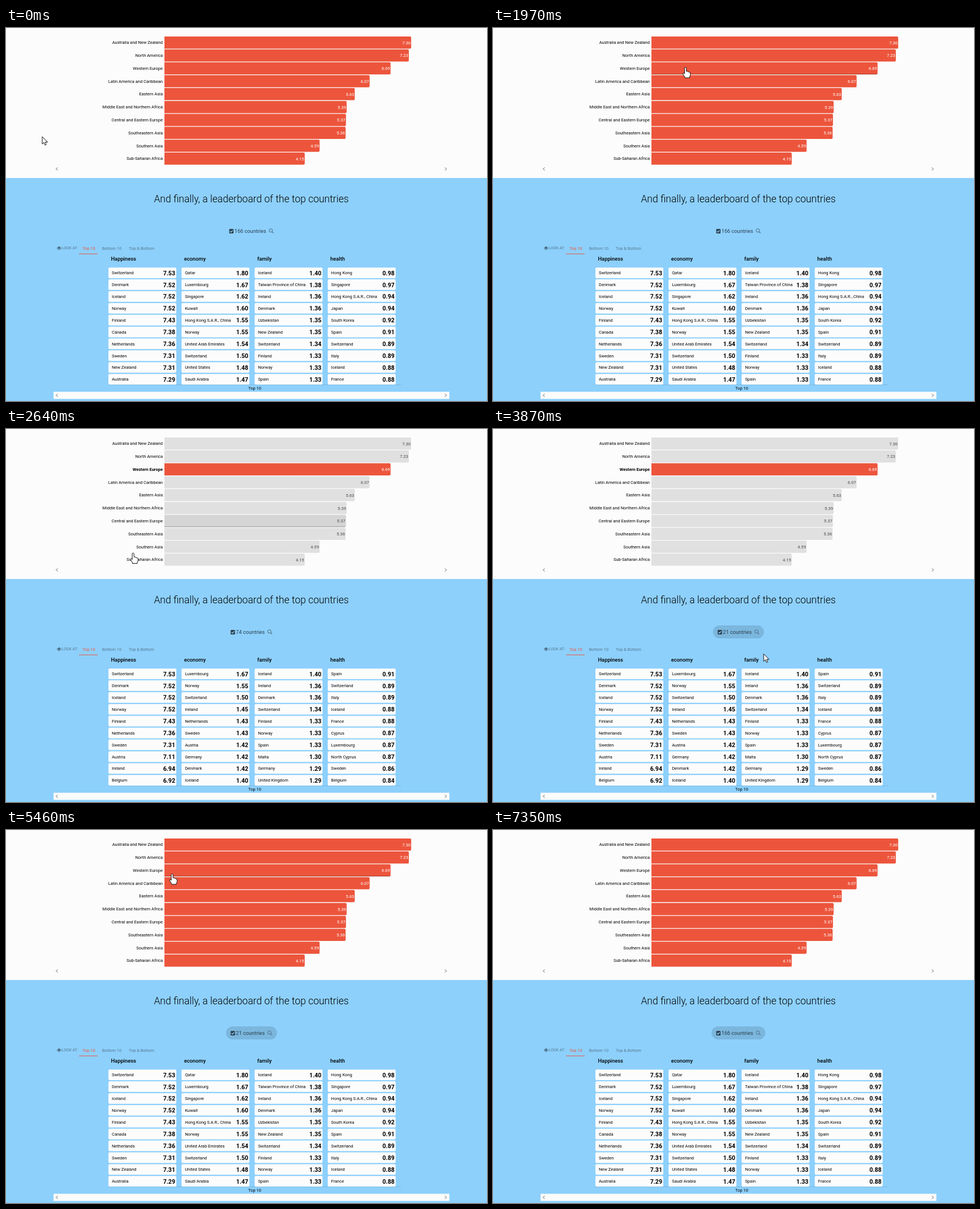
Write an HTML page that moves like this. It is 850 px wide and 659 px high and loops after 8130 ms.

```html
<!DOCTYPE html>
<html lang="en">
<head>
<meta charset="utf-8">
<title>Happiness leaderboard</title>
<style>
html, body { margin: 0; width: 100%; height: 100%; overflow: hidden; background: #fcfcfc; }
svg { display: block; }
#stage { position: absolute; left: 0; top: 0; font: 7.5px Roboto, "Open Sans", sans-serif; }
.end { text-anchor: end; }
.mid { text-anchor: middle; }
.title { font-size: 17.5px; font-weight: 300; }
.head { font-size: 9.3px; font-weight: 500; }
.score { font-size: 10.6px; font-weight: 700; }
.tab { font-size: 7.4px; fill: #56788f; }
.bar { fill: #ec553c; }
.num { fill: #fff; fill-opacity: .82; font-weight: 500; }
.shade { fill: #000; opacity: 0; }
.edge { fill: #000; opacity: 0; }
.hover .edge { opacity: .3; }
.picking .bar { fill: #e0e0e0; }
.picking .num { fill: #666; fill-opacity: 1; }
.picking .hover .shade { opacity: .05; }
.picking .chosen .bar { fill: #ec553c; }
.picking .chosen .num { fill: #fff; fill-opacity: .85; }
.picking .chosen .label { font-weight: 700; }
.picking .chosen .shade { opacity: 0; }
.chevron { fill: none; stroke: #999; stroke-width: 1.2; }
#pill { position: absolute; left: 433.5px; top: 347px; height: 23px; padding: 0 8px;
  transform: translateX(-50%); display: flex; align-items: center; white-space: nowrap;
  border-radius: 12px; font: 9.2px Roboto, "Open Sans", sans-serif; color: #2c4150; }
#pill.lit { background: #7bb6dd; }
#count { margin: 0 4.5px 0 2px; }
#pointer { position: absolute; left: 0; top: 0; }
#pointer path { fill: #fff; stroke: #111; stroke-linejoin: round; }
</style>
</head>
<body>
<svg id="stage" width="850" height="659"></svg>
<div id="pill">
  <svg width="8" height="8"><rect width="8" height="8" rx="1.5" fill="#2c4150"/><path d="M1.6 4L3.4 5.8 6.5 2.4" fill="none" stroke="#8dd0fc" stroke-width="1.3"/></svg>
  <span id="count"></span>
  <svg width="9" height="9"><path d="M5.9 5.9L8.4 8.4" stroke="#58819d" stroke-width="1.5"/><circle cx="3.7" cy="3.7" r="2.9" fill="none" stroke="#58819d" stroke-width="1.2"/></svg>
</div>
<svg id="pointer" width="850" height="659"><path/></svg>
<script>
const LOOP = 8130;
const $ = id => document.getElementById(id);
const stage = $('stage'), pill = $('pill'), count = $('count');
const cursor = document.querySelector('#pointer path');

const regions = `Australia and New Zealand 7.30|North America 7.23|Western Europe 6.69
Latin America and Caribbean 6.07|Eastern Asia 5.63|Middle East and Northern Africa 5.39
Central and Eastern Europe 5.37|Southeastern Asia 5.36|Southern Asia 4.59|Sub-Saharan Africa 4.15`;

const world = {
  Happiness: `Switzerland 7.53|Denmark 7.52|Iceland 7.52|Norway 7.52|Finland 7.43
Canada 7.38|Netherlands 7.36|Sweden 7.31|New Zealand 7.31|Australia 7.29`,
  economy: `Qatar 1.80|Luxembourg 1.67|Singapore 1.62|Kuwait 1.60|Hong Kong S.A.R., China 1.55
Norway 1.55|United Arab Emirates 1.54|Switzerland 1.50|United States 1.48|Saudi Arabia 1.47`,
  family: `Iceland 1.40|Taiwan Province of China 1.38|Ireland 1.36|Denmark 1.36|Uzbekistan 1.35
New Zealand 1.35|Switzerland 1.34|Finland 1.33|Norway 1.33|Spain 1.33`,
  health: `Hong Kong 0.98|Singapore 0.97|Hong Kong S.A.R., China 0.94|Japan 0.94|South Korea 0.92
Spain 0.91|Switzerland 0.89|Italy 0.89|Iceland 0.88|France 0.88`
};
const west = {
  Happiness: `Switzerland 7.53|Denmark 7.52|Iceland 7.52|Norway 7.52|Finland 7.43
Netherlands 7.36|Sweden 7.31|Austria 7.11|Ireland 6.94|Belgium 6.92`,
  economy: `Luxembourg 1.67|Norway 1.55|Switzerland 1.50|Ireland 1.45|Netherlands 1.43
Sweden 1.43|Austria 1.42|Germany 1.42|Denmark 1.42|Iceland 1.40`,
  family: `Iceland 1.40|Ireland 1.36|Denmark 1.36|Switzerland 1.34|Finland 1.33
Norway 1.33|Spain 1.33|Malta 1.30|Germany 1.29|United Kingdom 1.29`,
  health: `Spain 0.91|Switzerland 0.89|Italy 0.89|Iceland 0.88|France 0.88
Cyprus 0.87|Luxembourg 0.87|North Cyprus 0.87|Sweden 0.86|Belgium 0.84`
};

const parse = list => list.split(/[|\n]/).map(s => [s.slice(0, -5), s.slice(-4)]);
const text = (x, y, s, cls = '') => `<text x="${x}" y="${y}" class="${cls}">${s}</text>`;
const rect = (x, y, w, h, more) => `<rect x="${x}" y="${y}" width="${w}" height="${h}" ${more}/>`;
const chevrons = y => `<path class="chevron" d="M91.5 ${y - 2.6}L88.5 ${y} 91.5 ${y + 2.6}M775.5 ${y - 2.6}L778.5 ${y} 775.5 ${y + 2.6}"/>`;

const BAR_TOP = 15, BAR_STEP = 22.78;

function barRow([name, value], i) {
  const y = BAR_TOP + i * BAR_STEP, w = value * 59.73;
  const shape = `d="M280 ${y}h${w - 2}q2 0 2 2v17.5q0 2 -2 2h${2 - w}z"`;
  return `<g class="row ${i === 2 ? 'chosen' : ''}">` +
    `<path class="bar" ${shape}/><path class="shade" ${shape}/>` +
    rect(280, y + 20.5, w - 1, 1, 'class="edge"') +
    text(277, y + 13.3, name, 'label end') +
    text(279 + w, y + 13.7, value, 'num end') + '</g>';
}

function table(id, data) {
  const columns = Object.entries(data).map(([head, list], c) => {
    const x = 181 + c * 129.2;
    return text(x + 4.5, 410.5, head, 'head') + parse(list).map(([name, value], r) => {
      const y = 423.2 + r * 20.9;
      return rect(x, y, 120, 18.7, 'rx="2" fill="#fcfcfc"') +
        text(x + 6, y + 12, name) + text(x + 118, y + 13.4, value, 'score end');
    }).join('');
  });
  return `<g id="${id}">${columns.join('')}</g>`;
}

stage.innerHTML =
  rect(0, 265, 850, 394, 'fill="#8dd0fc"') +
  parse(regions).map(barRow).join('') +
  chevrons(249) +
  text(433.5, 308, 'And finally, a leaderboard of the top countries', 'title mid') +
  '<path d="M90.3 389q3.5 -5 7 0q-3.5 5 -7 0z" fill="none" stroke="#3f596b"/><circle cx="93.8" cy="388.6" r="1.6" fill="#3f596b"/>' +
  '<text x="98.7" y="391.4" class="tab" style="font-size:6.8px">LOOK AT:</text>' +
  '<text x="135" y="391.7" class="tab" style="fill:#ec553c">Top 10</text>' +
  text(169.7, 391.7, 'Bottom 10', 'tab') + text(217, 391.7, 'Top &amp; Bottom', 'tab') +
  rect(129, 398.6, 33, 1, 'fill="#ec553c"') +
  rect(181, 629.8, 517, .8, 'fill="#7ab2d8"') +
  table('world', world) + table('west', west) +
  text(439.5, 639.4, 'Top 10', 'mid') +
  rect(84, 642.7, 699.5, 12.6, 'fill="#fbfbfb"') + chevrons(649);

const rows = [...document.querySelectorAll('.row')];

// The screen refreshes in bursts: start, end, number of steps.
const bursts = [[280, 1180, 8], [1330, 1970, 5], [2370, 3270, 8], [3420, 4410, 8],
  [4530, 5460, 8], [5610, 6540, 8], [6690, 7350, 6]];

function stepTime(t) {
  const burst = bursts.filter(b => b[0] <= t).pop();
  if (!burst) return 0;
  const [start, end, n] = burst, step = (end - start) / (n - 1);
  return start + step * Math.min(n - 1, Math.floor((t - start + 30) / step));
}

// Pointer tip: time, x, y.
const track = [[280, 64, 192], [537, 200, 207], [794, 330, 120], [1050, 212.5, 11], [1330, 212.5, 11],
  [1810, 340.5, 69.5], [2370, 340.5, 69.5], [2627, 225, 219], [3270, 330, 320], [3420, 330, 320],
  [3700, 410, 358], [4000, 552, 440], [4200, 450, 490], [4410, 435, 357], [4530, 435, 357],
  [5200, 294, 77.5], [5477, 294, 77.5], [6009, 352, 480.5], [6540, 430, 358], [6690, 430, 358],
  [6900, 524, 432], [7220, 241, 255]];

function pointerAt(t) {
  const i = track.findIndex(k => k[0] > t);
  if (i < 1) return track.at(i).slice(1);
  const [t0, x0, y0] = track[i - 1], [t1, x1, y1] = track[i];
  const u = (t - t0) / (t1 - t0);
  return [x0 + (x1 - x0) * u, y0 + (y1 - y0) * u];
}

const ARROW = 'M0 0V13L3 10.2 5 15 7.2 14 5.2 9.6H9.5Z';
const HAND = 'M-2 2Q-2 0 -.5 0T1.2 2V7Q3.5 6.3 4 8Q6 7.3 6.5 9Q8.3 8.6 8.3 10.5V13Q8.3 15 7 16.5V18.5H-1.5V17Q-4 13.5 -5 11.5Q-5 9.7 -3.5 10L-2 11.5Z';
const inside = (x, y, l, t, r, b) => x >= l && x <= r && y >= t && y <= b;
const overBars = (x, y) => inside(x, y, 165, 15, 716, 242);
const clickable = (x, y) => overBars(x, y) || inside(x, y, 386, 345, 481, 371) || inside(x, y, 181, 423, 688, 630);

function easeOut(t, start) {
  const u = Math.min(1, Math.max(0, (t - start) / 900));
  return 1 - (1 - u) ** 3;
}

function draw(now) {
  const t = stepTime(now % LOOP);
  const [x, y] = pointerAt(t);
  cursor.setAttribute('d', clickable(x, y) ? HAND : ARROW);
  cursor.setAttribute('transform', `translate(${x} ${y})`);
  cursor.style.display = t > 7340 ? 'none' : '';

  // Hover trails the pointer slightly.
  const [hx, hy] = pointerAt(t - 97);
  const hovered = overBars(hx, hy) ? Math.floor((hy - BAR_TOP) / BAR_STEP) : -1;
  rows.forEach((row, i) => row.classList.toggle('hover', i === hovered));

  stage.classList.toggle('picking', t >= 2370 && t < 5450);
  const filtered = t >= 2490 && t < 5450;
  $('west').style.display = filtered ? '' : 'none';
  $('world').style.display = filtered ? 'none' : '';

  pill.classList.toggle('lit', t >= 3600);
  count.textContent = Math.round(166 - 145 * (easeOut(t, 2372) - easeOut(t, 5531))) + ' countries';
}

const began = performance.now();
function tick() {
  draw(performance.now() - began);
  requestAnimationFrame(tick);
}
tick();
</script>
</body>
</html>
```
